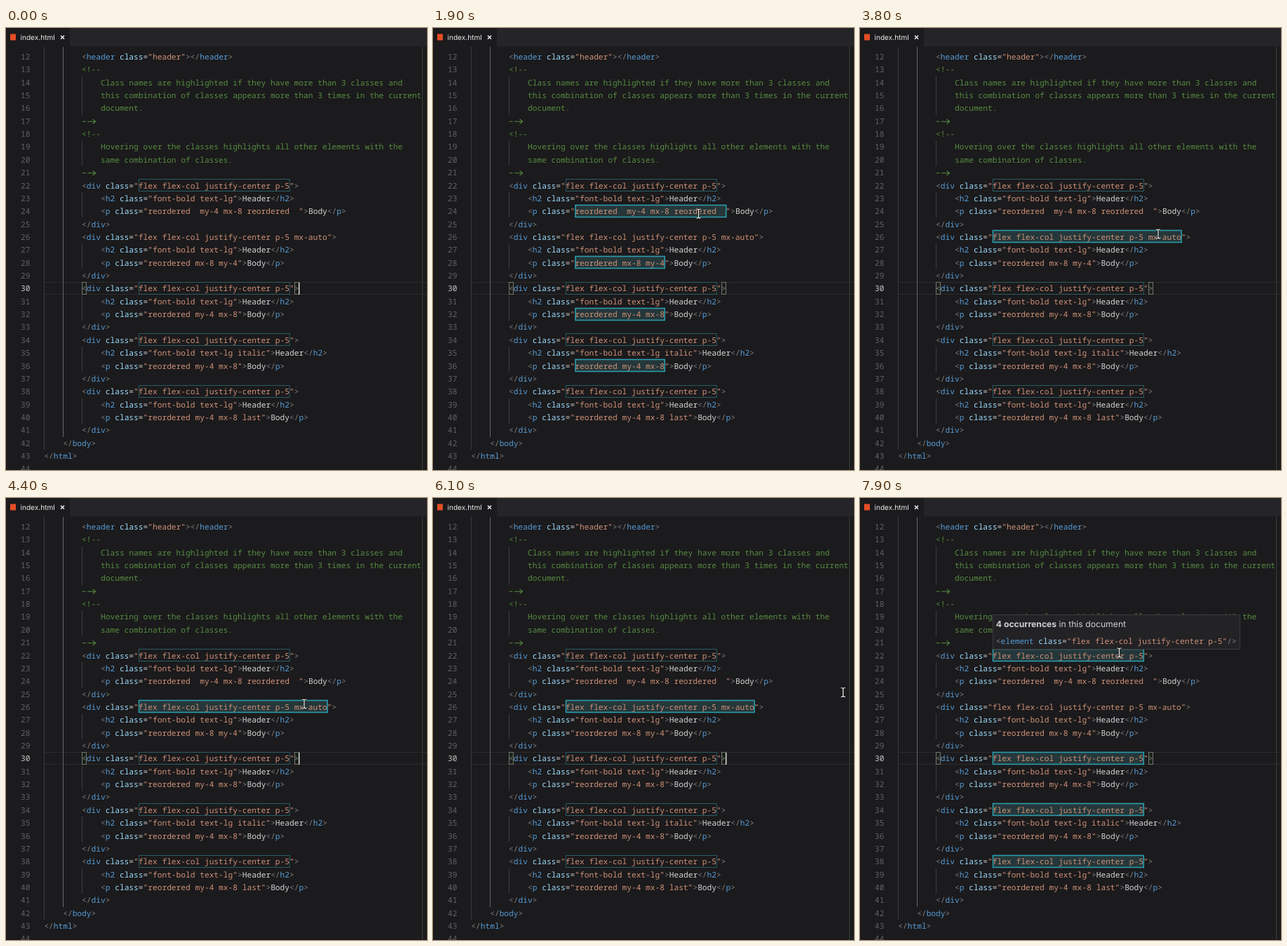
Animation of 600 by 630 pixels, one loop 8 s. Source, as an HTML page:

```html
<!DOCTYPE html>
<html lang="en">
<head>
<meta charset="utf-8">
<title>index.html</title>
<style>
html, body { margin: 0; width: 100%; height: 100%; overflow: hidden; background: #1b1a1c; }
svg { display: block; width: 600px; height: 630px; }
text { font: 11.21px "Noto Sans Mono", "DejaVu Sans Mono", monospace; white-space: pre; text-rendering: geometricPrecision; }
.ui { font-family: Inter, "Open Sans", sans-serif; }
.punct { fill: #808080; }
.tag { fill: #569cd6; }
.attr { fill: #9cdcfe; }
.string { fill: #ce9178; }
.plain { fill: #d4d4d4; }
.comment { fill: #568c42; }
.number { fill: #626166; text-anchor: end; }
.number.current { fill: #c6c6c6; }
.box { fill: none; stroke: #285d64; }
.hover { fill: #25373a; stroke: #2b9cab; stroke-width: 1.6; }
.bracket { fill: #1a2119; stroke: #747474; }
</style>
</head>
<body>
<svg id="stage" viewBox="0 0 600 630" xmlns="http://www.w3.org/2000/svg"></svg>
<script>
const NS = 'http://www.w3.org/2000/svg';
const LOOP = 8000, STEP = 100;
const CH = 6.726, ROW = 18.355, LEFT = 54.3, FIRST = 12;

const flex = 'flex flex-col justify-center p-5';
const source = [
  [8, '<header class="header"></header>'],
  [8, '<!--'],
  [12, 'Class names are highlighted if they have more than 3 classes and'],
  [12, 'this combination of classes appears more than 3 times in the current'],
  [12, 'document.'],
  [8, '-->'],
  [8, '<!--'],
  [12, 'Hovering over the classes highlights all other elements with the'],
  [12, 'same combination of classes.'],
  [8, '-->'],
  ...card(flex, 'font-bold text-lg', 'reordered  my-4 mx-8 reordered  '),
  ...card(flex + ' mx-auto', 'font-bold text-lg', 'reordered mx-8 my-4'),
  ...card(flex, 'font-bold text-lg', 'reordered my-4 mx-8'),
  ...card(flex, 'font-bold text-lg italic', 'reordered my-4 mx-8'),
  ...card(flex, 'font-bold text-lg', 'reordered my-4 mx-8 last'),
  [4, '</body>'],
  [0, '</html>'],
  [0, '']
];

function card(outer, head, body) {
  return [
    [8, `<div class="${outer}">`],
    [12, `<h2 class="${head}">Header</h2>`],
    [12, `<p class="${body}">Body</p>`],
    [8, '</div>']
  ];
}

const colX = col => LEFT + col * CH;
const midY = line => 41 + (line - FIRST) * ROW;

function add(parent, name, attrs, text) {
  const el = document.createElementNS(NS, name);
  for (const key in attrs) el.setAttribute(key, attrs[key]);
  if (text !== undefined) el.textContent = text;
  return parent.appendChild(el);
}

const stage = document.getElementById('stage');
const group = () => add(stage, 'g', {});
const show = (el, on) => el.setAttribute('visibility', on ? 'visible' : 'hidden');
const rect = (g, x, y, width, height, rest) => add(g, 'rect', { x, y, width, height, ...rest });
const rule = (g, x, from, to, stroke) => add(g, 'path', { d: `M${x} ${from}V${to}`, stroke });

function code(g, text, x, y) {
  const token = /<\/?|\/?>|"[^"]*"|=|[\w]+|\s+/g;
  let inTag = false, prev = '';
  for (const { 0: part, index } of text.matchAll(token)) {
    let kind = 'plain';
    if (/^<|>$/.test(part)) { kind = 'punct'; inTag = part[0] === '<'; }
    else if (part[0] === '"') kind = 'string';
    else if (inTag && part !== '=') kind = prev[0] === '<' ? 'tag' : 'attr';
    if (part.trim()) add(g, 'text', { x: x + index * CH, y, class: kind }, part);
    prev = part;
  }
}

function arrow(g, x, y) {
  add(g, 'path', {
    d: `M${x + 0.5} ${y}h5M${x + 8} ${y}h11.5m-4 -3.4l4 3.4l-4 3.4`,
    fill: 'none', stroke: '#568c42', 'stroke-width': 1.1
  });
}

function classBox(g, line, col, chars, type) {
  rect(g, colX(col) + 0.7, Math.floor(midY(line) - 9) + 0.5, chars * CH - 0.5, 17, { class: type });
}

// Current line, guides and ruler
const back = group();
for (const y of [362.5, 379.5]) add(back, 'path', { d: `M54 ${y}H600`, stroke: '#2c2b2d' });
rule(back, 54.5, 27, 601, '#3c3b3d');
rule(back, 81.5, 27, 583, '#646365');
for (const [from, to] of [[14, 16], [19, 20], [23, 24], [27, 28], [31, 32], [35, 36], [39, 40]])
  rule(back, 108.5, midY(from) - ROW / 2, midY(to) + ROW / 2, '#3c3b3d');
rule(back, 593.5, 27, 630, '#3a4038');
for (const line of [22, 30, 34, 38]) classBox(back, line, 20, 32, 'box');
for (const col of [8, 53]) rect(back, Math.round(colX(col)) + 0.5, 362.5, 6, 17, { class: 'bracket' });

// Each entry: start, end and boxes as line, column, length
const hovers = [
  [1700, 3800, [[24, 22, 32], [28, 22, 19], [32, 22, 19], [36, 22, 19]]],
  [3800, 6600, [[26, 20, 40]]],
  [6600, 8000, [[22, 20, 32], [30, 20, 32], [34, 20, 32], [38, 20, 32]]]
].map(([from, to, boxes]) => {
  const el = group();
  boxes.forEach(box => classBox(el, ...box, 'hover'));
  return { from, to, el };
});

const page = group();
source.forEach(([indent, text], i) => {
  const line = FIRST + i, y = midY(line) + 4, x = colX(indent);
  add(page, 'text', { x: 34.4, y, class: line === 30 ? 'number current' : 'number' }, line);
  if (text === '-->') arrow(page, x, midY(line) + 0.5);
  else if (line > 12 && line < 22) add(page, 'text', { x, y, class: 'comment' }, text);
  else code(page, text, x, y);
});

const caret = rect(stage, 417, 363, 1.4, 17, { fill: '#e4e4e4' });

// Tab bar
const bar = group();
rect(bar, 0, 0, 600, 26.5, { fill: '#252428' });
rect(bar, 0, 0, 91, 26.5, { fill: '#1b1a1c' });
rect(bar, 6, 8.5, 8, 9, { fill: '#e44d26' });
add(bar, 'text', { x: 20.5, y: 17, class: 'ui', fill: '#ececec', style: 'font-size:10.1px' }, 'index.html');
add(bar, 'path', { d: 'M78 10.7l5 5m0 -5l-5 5', stroke: '#f0f0f0', 'stroke-width': 1.5 });

function tooltip(from, to, x, y, classes) {
  const el = group(), text = `<element class="${classes}"/>`;
  rect(el, x, y, Math.round(text.length * CH + 8.5), 49, { fill: '#232225', stroke: '#3c3b3e' });
  const title = add(el, 'text', { x: x + 4.3, y: y + 17, class: 'ui', fill: '#d0d0d0', style: 'font-size:12.2px' });
  add(title, 'tspan', { 'font-weight': 700 }, '4 occurrences');
  add(title, 'tspan', {}, ' in this document');
  code(el, text, x + 4.3, y + 41.7);
  return { from, to, el };
}
const timed = [
  ...hovers,
  tooltip(2000, 3200, 203.5, 202.5, 'reordered my-4 mx-8'),
  tooltip(7200, 8000, 189.5, 166.5, flex)
];

const mouse = group();
const beam = 'M-3 -6.5Q0 -6.5 0 -4.8Q0 -6.5 3 -6.5M0 -5V5M-3 6.5Q0 6.5 0 4.8Q0 6.5 3 6.5';
add(mouse, 'path', { d: beam, fill: 'none', stroke: '#161616', 'stroke-width': 2.6 });
add(mouse, 'path', { d: beam, fill: 'none', stroke: '#f2f2f2', 'stroke-width': 1.2 });

// Pointer path: time, x, y
const path = [
  [500, 470, 330], [1200, 383.5, 266.5], [1300, 383.5, 266.5], [1600, 378.5, 264.5],
  [3100, 378.5, 264.5], [3600, 425, 293.5], [5100, 425, 293.5], [5500, 572, 281],
  [5900, 584.5, 277], [6200, 584.5, 277], [6600, 369.5, 220.5], [8000, 369.5, 220.5]
];
const ease = p => p * p * (3 - 2 * p);

function pointer(t) {
  const i = Math.max(1, path.findIndex(k => k[0] > t));
  const [t0, x0, y0] = path[i - 1], [t1, x1, y1] = path[i];
  const p = ease(Math.min(1, Math.max(0, (t - t0) / (t1 - t0))));
  return [x0 + (x1 - x0) * p, y0 + (y1 - y0) * p];
}

function draw(t) {
  for (const { from, to, el } of timed) show(el, t >= from && t < to);
  show(caret, t % 1000 < 500);
  show(mouse, t >= path[0][0]);
  mouse.setAttribute('transform', `translate(${pointer(t)})`);
}

const start = performance.now();
function tick() {
  const t = (performance.now() - start) % LOOP;
  draw(Math.floor(t / STEP) * STEP);
  requestAnimationFrame(tick);
}
tick();
</script>
</body>
</html>
```
